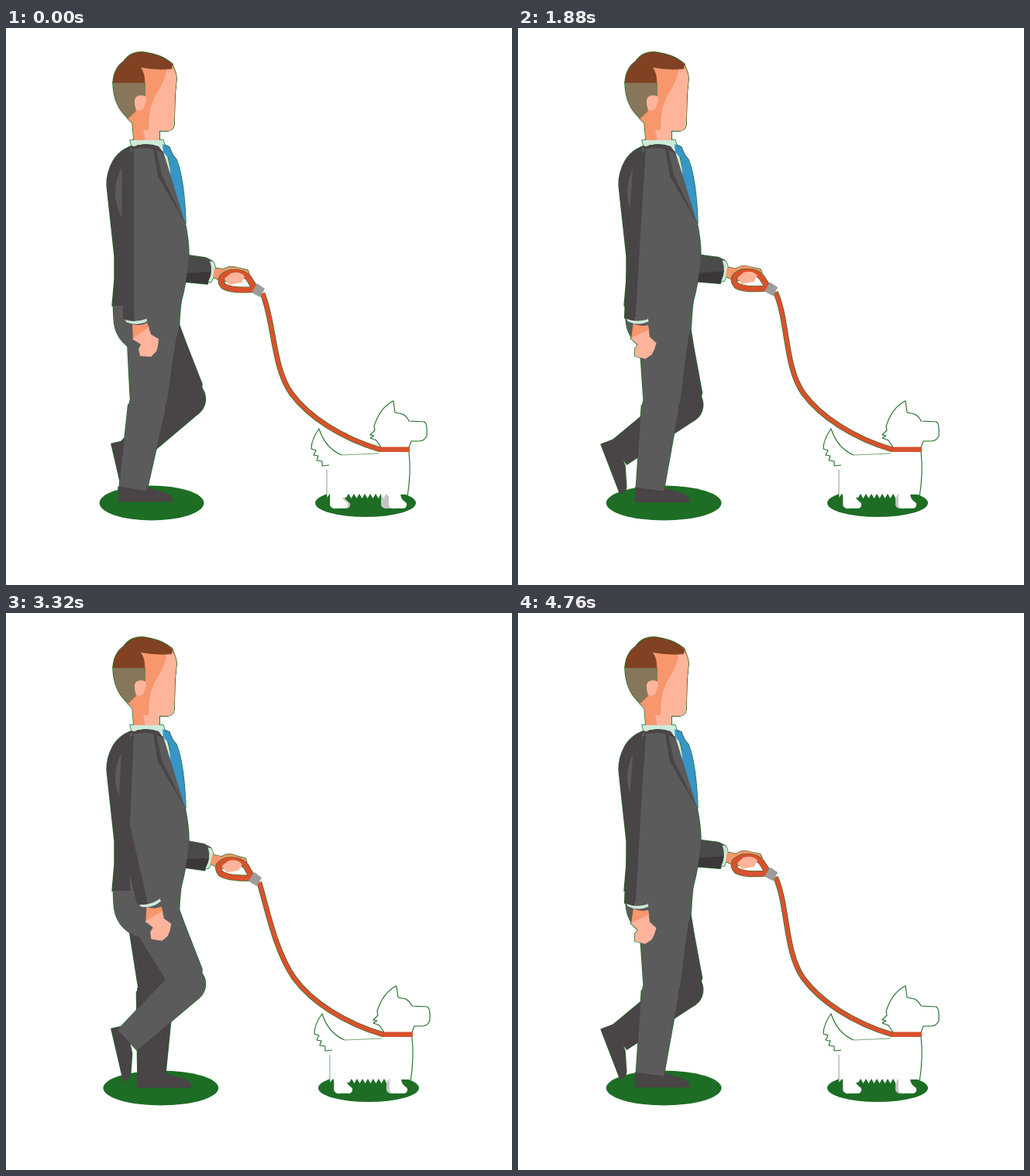
An HTML page with a canvas that plays this animation: 653 px wide and 720 px high, repeating every 4800 ms.

```html
<!DOCTYPE html>
<html lang="en">
<head>
<meta charset="utf-8">
<title>Walking the dog</title>
<style>
html, body { margin: 0; width: 100%; height: 100%; overflow: hidden; background: #fff; }
canvas { display: block; width: 653px; height: 720px; }
</style>
</head>
<body>
<canvas id="stage" width="653" height="720"></canvas>
<script>
const ctx = document.getElementById('stage').getContext('2d');
const STEP = 40, CYCLE = 24;
const DARK = '#494445', GREY = '#5b5b5b', GREEN = '#1d6d24', RED = '#d9512d';
const SKIN = '#feb49b', SHADE = '#f8966c', MINT = '#cdebd9', WHITE = '#fff';
const wave = (t, period = CYCLE) => Math.sin(t / period * 2 * Math.PI);
const path = d => new Path2D(d);

// step, thigh, shin, foot (degrees)
const GAIT = [
  [0, -2, -9.4, 0], [3, -13, -18, 3], [6, -20, -38, 30], [8, -6, -58, 58],
  [10, 16.4, -53.5, 69], [11, 27.3, -46.5, 77], [13, 33, -18, 20], [15, 31, 10, -12],
  [16, 28, 16, -15], [18, 20, 13, 0], [20, 13, 5, 0], [22, 4, -2.5, 0], [23, -1, -7, 0]
];
// step, upper arm, forearm, hand (degrees)
const SWING = [
  [0, 0, 0, 0], [3, 9, 13, 7], [6, 13, 24, 11], [9, 7, 21, 4], [11, -2.5, 13, -5.5],
  [12, -6, 8, -9], [15, -17, -9, -18], [18, -21, -17, -23], [21, -11, -10, -18], [23, -3.8, -3.3, -11]
];

// Smooth periodic interpolation through the rows of a table.
function pose(table, time) {
  const n = table.length, t = time % CYCLE;
  let i = n - 1;
  while (table[i][0] > t) i--;
  const key = j => {
    const row = table[(j + n) % n], turn = Math.floor(j / n) * CYCLE;
    return [row[0] + turn, ...row.slice(1)];
  };
  const a = key(i - 1), b = key(i), c = key(i + 1), d = key(i + 2);
  const h = c[0] - b[0], u = (t - b[0]) / h;
  return [1, 2, 3].map(k => {
    const m0 = (c[k] - a[k]) / (c[0] - a[0]) * h;
    const m1 = (d[k] - b[k]) / (d[0] - b[0]) * h;
    const v = 1 - u;
    return b[k] * (1 + 2 * u) * v * v + m0 * u * v * v + c[k] * u * u * (3 - 2 * u) - m1 * u * u * v;
  });
}

const leg = {
  thigh: path('M-29 0L-28 18L-22 88L-20 108H20L26 98L32 40L38 -8Z'),
  knee: path('M24 0A23.5 23.5 0 1 1 -23 0A23.5 23.5 0 1 1 24 0Z'),
  shin: path('M-24 0H24L18 106H-18Z'),
  foot: path('M-19 -2H18Q31 2 44 6Q52 10 51 17H-19Z')
};
const arm = {
  upperBack: path('M-15 18L-16 105L-14 118H0V-5Z'),
  upperFront: path('M0 -4H17V115H0Z'),
  foreBack: path('M-15 0L-14 101Q-6 104 0 104V0Z'),
  foreFront: path('M0 0H17L16 101Q8 104 0 104Z'),
  cuff: path('M-12 99H16L17 104Q4 111 -10 105Z'),
  palm: path('M-3 3Q8 6 16 1L19 8L-2 23Z'),
  fingers: path('M-3 22L18 7L21 16L31 22L30 31L28 38L21 45L7 44L5 35L8 29Z')
};
const lead = [
  ['#4b4a4a', path('M228 293L237 294L258 297L266 301L264 318H228Z')],
  ['#3b3738', path('M228 317L266 315L260 331L228 328Z')],
  [MINT, path('M263 301L267 302Q272 308 269 319L265 328H261Q268 315 263 301Z')],
  [SHADE, path('M269 310L281 312Q289 306 299 310L312 313L314 318L304 320L288 328L276 326L267 322Z')]
];
const grip = path('M321 336L313 323Q303 313 287 317Q272 323 281 334Q291 340 321 338');
const fingers = path('M282 324L290 317Q302 314 308 321L304 329L288 332Z');
const clamp = path('M324 330L334 337L328 348L317 342Z');

const pelvis = [[GREY, path('M138 352H226L224 375Q224 397 215 407L195 418H168Q140 405 139 375Z')]];
const torso = [
  [DARK, path('M178 149Q150 152 138 172Q130 186 130 203L134 240L140 295V325L137 359H160L165 358L195 158Z')],
  [GREY, path('M150 179Q132 212 150 247Z')],
  [MINT, path('M160 145H203L205 152L216 200L200 165L162 152Z')],
  ['#3895c8', path('M202 150L211 154Q214 164 220 170Q230 195 232 252L226 240L212 190L211 170L203 160Z')],
  [GREY, path('M160 156L170 151H190L203 160L231 251Q236 275 236 294Q234 325 225 358H160Z')],
  [DARK, path('M163 155Q178 146 197 153L204 163L193 157Q178 153 163 157Z')],
  [DARK, path('M190 156L194 157L201 190L231 252L196 192Z')]
];
const head = [
  [SHADE, path('M160 45H214Q220 58 220 66L218 86L217 125Q216 133 208 133H198V146H165L163 123L157 117Z')],
  [SKIN, path('M208 50H214Q220 58 220 66L218 86L217 125Q216 133 208 133H198V146H180L177 132H184Q183 105 193 87Q207 66 208 50Z')],
  ['#877659', path('M138 70H180V88Q165 87 166 97L168 107L158 117Q138 100 138 70Z')],
  ['#804222', path('M138 71Q139 52 152 43Q160 31 176 31Q202 34 215 47L214 53Q194 55 174 51Q180 60 179 71Z')],
  [SKIN, path('M166 97Q165 87 174 87Q182 87 181 94L177 105Q169 110 167 103Z')]
];

let teeth = '';
for (let x = 442; x < 485; x += 7) teeth += `L${x} 602L${x + 3.5} 608`;
const dog = {
  body: path(`M481 550L433 552L417 566L414 576V607L418 602L421 607H439${teeth}L490 602L497 608L503 603H518Q523 575 520 548Z`),
  tail: path('M433 552Q412 543 404 518Q394 532 394 544L400 546L397 552L403 553L401 559L408 560L408 566L417 565'),
  head: path('M484 542L478 533L470 530L475 527L470 526L476 520L475 515Q482 492 498 483L500 482L502 497L512 499Q518 503 520 508L540 509Q544 512 543 527Q540 534 533 534H523L520 542'),
  chest: path('M520 548Q523 575 518 606'),
  back: path('M481 550L433 552M414 571V606'),
  paw: path('M0 0V17Q2 22 8 21H20Q27 16 19 11Q15 8 15 0Z')
};

const at = (x, y) => new DOMMatrix().translate(x, y);
const still = new DOMMatrix();

function legParts(p, color) {
  const [thigh, shin, foot] = pose(GAIT, p);
  const hip = at(185, 385).rotate(-thigh);
  const knee = hip.translate(0, 106).rotate(thigh - shin);
  const ankle = knee.translate(0, 106).rotate(shin + foot);
  return [
    [DARK, leg.foot, ankle], [color, leg.shin, knee],
    [color, leg.thigh, hip], [color, leg.knee, knee]
  ];
}

function armParts(t) {
  const [upper, fore, hand] = pose(SWING, t);
  const shoulder = at(165, 160).rotate(-upper);
  const elbow = shoulder.translate(0, 115).rotate(upper - fore);
  const wrist = elbow.translate(1, 105).rotate(fore - hand);
  return [
    [SHADE, arm.palm, wrist], [SKIN, arm.fingers, wrist], [MINT, arm.cuff, elbow],
    [DARK, arm.upperBack, shoulder], [GREY, arm.upperFront, shoulder],
    [GREY, arm.foreFront, elbow], [DARK, arm.foreBack, elbow]
  ];
}

// All edges first, then all fills: only the joint silhouette keeps its rim.
function drawParts(parts) {
  ctx.strokeStyle = GREEN;
  ctx.lineWidth = 1.4;
  for (const [, shape, m = still] of parts) {
    ctx.setTransform(m);
    ctx.stroke(shape);
  }
  for (const [color, shape, m = still] of parts) {
    ctx.setTransform(m);
    ctx.fillStyle = color;
    ctx.fill(shape);
  }
  ctx.setTransform(still);
}

function shadow(x, y, rx, ry) {
  ctx.fillStyle = GREEN;
  ctx.beginPath();
  ctx.ellipse(x, y, rx, ry, 0, 0, 2 * Math.PI);
  ctx.fill();
}

function rope(shape, width) {
  ctx.strokeStyle = GREEN;
  ctx.lineWidth = width + 1.2;
  ctx.stroke(shape);
  ctx.strokeStyle = RED;
  ctx.lineWidth = width;
  ctx.stroke(shape);
}

function paw(x, color) {
  ctx.setTransform(at(x, 600));
  ctx.fillStyle = color;
  ctx.fill(dog.paw);
}

function drawDog(t, dx) {
  const trot = wave(t, 12), place = at(dx, 0);
  shadow(464 + dx, 614, 65, 18);
  paw(421 + 4 * trot + dx, '#c6c6c6');
  paw(484 - 6 * trot + dx, '#c6c6c6');
  ctx.setTransform(place);
  ctx.fillStyle = WHITE;
  for (const k of ['body', 'tail', 'head']) ctx.fill(dog[k]);
  ctx.strokeStyle = GREEN;
  ctx.lineWidth = 1.1;
  for (const k of ['tail', 'head', 'chest']) ctx.stroke(dog[k]);
  ctx.lineWidth = 0.6;
  ctx.stroke(dog.back);
  paw(418 - 4 * trot + dx, WHITE);
  paw(494 + 6 * trot + dx, WHITE);
  ctx.setTransform(place);
  ctx.fillStyle = RED;
  ctx.fillRect(481, 541.5, 40, 6.5);
  ctx.setTransform(still);
}

function drawLeash(hand, dx) {
  const c = hand.transformPoint(new DOMPoint(331, 343));
  const mx = 368 + dx, my = 472;
  rope(path(`M${c.x} ${c.y}C${2 * c.x - 316} ${c.y + 36} ${mx - 24} ${my - 34} ${mx} ${my}` +
    `C${mx + 22} ${my + 30} ${432 + dx} 530 ${483 + dx} 545`), 5.6);
}

function draw(t) {
  ctx.setTransform(still);
  ctx.fillStyle = WHITE;
  ctx.fillRect(0, 0, 653, 720);

  const dx = 2 - 2 * wave(t + 6);
  const sway = wave(t - 1) + 0.26;
  const hand = at(240 - 3.5 * sway, 310 + 1.3 * sway).rotate(3.4 * sway).translate(-240, -310);

  shadow(194 - 6 * wave(t + 6), 614, 93.5 - 27 * wave(t + 2.5, 12), 22.5);
  drawDog(t, dx);
  drawLeash(hand, dx);
  drawParts([
    ...lead.map(([color, shape]) => [color, shape, hand]),
    ...legParts(t + 11, DARK), ...legParts(t, GREY),
    ...pelvis, ...head, ...torso, ...armParts(t)
  ]);

  ctx.setTransform(hand);
  rope(grip, 7);
  ctx.fillStyle = SKIN;
  ctx.fill(fingers);
  ctx.fillStyle = '#9b9d9c';
  ctx.fill(clamp);
}

ctx.lineJoin = 'round';
const start = performance.now();
function tick() {
  const ms = Math.max(0, performance.now() - start);
  draw(Math.floor(ms / STEP) % CYCLE);
  requestAnimationFrame(tick);
}
tick();
</script>
</body>
</html>
```
